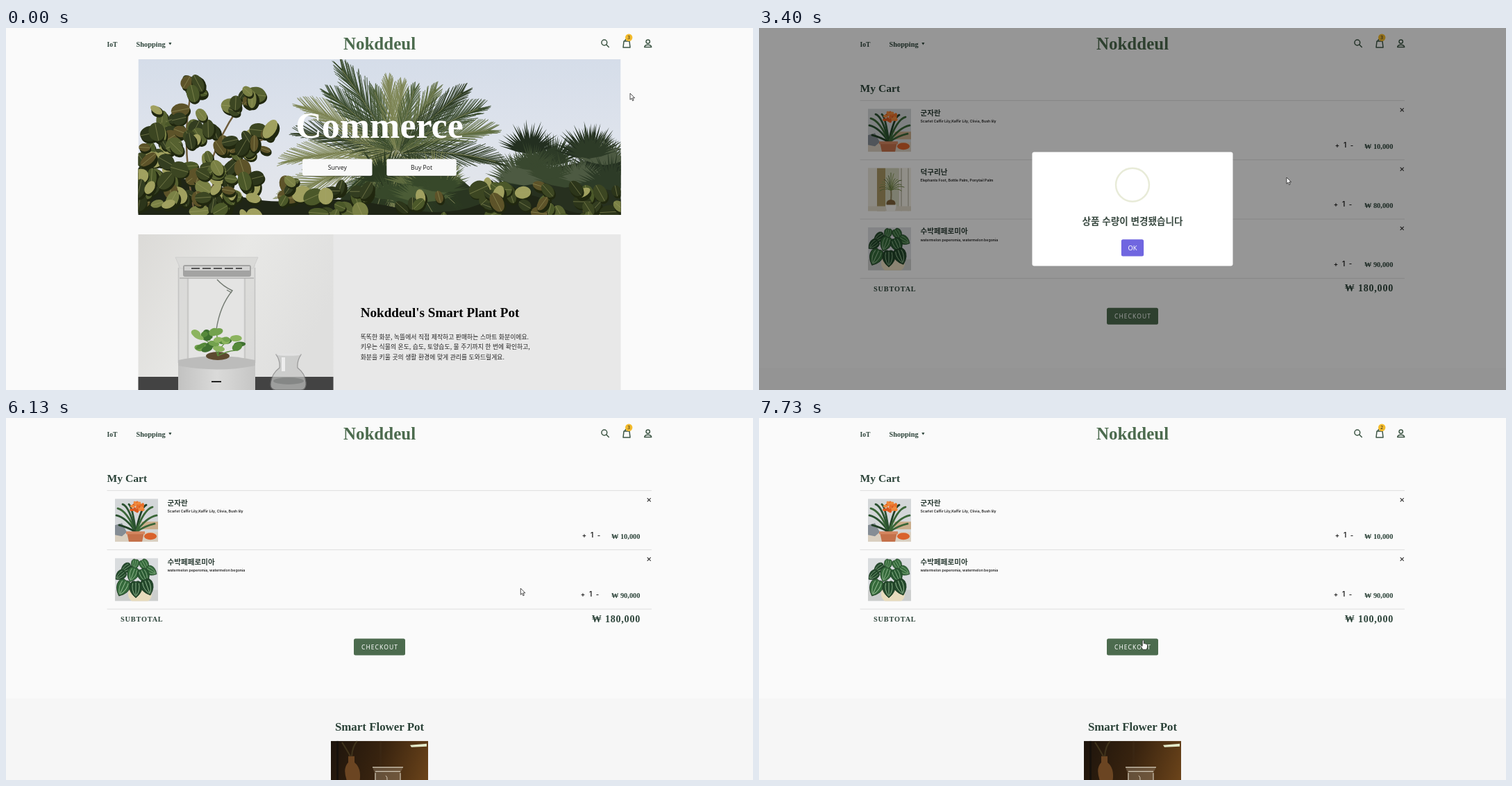
An HTML page that plays this animation: 1076 by 521 pixels, repeating every 8000 ms.

```html
<!DOCTYPE html>
<html lang="ko">
<head>
<meta charset="utf-8">
<title>Plant shop cart</title>
<style>
html, body { margin: 0; width: 100%; height: 100%; overflow: hidden; background: #fafafa; }
svg { display: block; }
#stage { width: 100vw; height: 100vh; }
text { white-space: pre; }
.serif { font-family: "Liberation Serif", "Noto Serif", serif; font-weight: 700; fill: #2c4339; }
.sans { font-family: "Noto Sans", "Open Sans", sans-serif; fill: #222; }
.kor { font-family: "Noto Sans CJK KR", "Noto Sans CJK", "Noto Sans", sans-serif; fill: #222; }
.inter { font-family: Inter, Roboto, sans-serif; font-weight: 600; fill: #222; }
.mid { text-anchor: middle; }
.end { text-anchor: end; }
.ico { fill: none; stroke: #3c5544; stroke-width: 1.5; stroke-linecap: round; stroke-linejoin: round; }
</style>
</head>
<body>
<svg id="stage" viewBox="0 0 1076 521" preserveAspectRatio="none"></svg>
<script>
const LOOP = 8000, TICK = 1000 / 15, PITCH = 85.3;
const GREEN = '#4c6b4e', OLIVE = '#a3ae7e', VIOLET = '#7066e0';

let seed = 7;
const rnd = (a = 0, b = 1) => {
  seed = (seed * 16807) % 2147483647;
  return a + (b - a) * seed / 2147483647;
};
const pick = list => list[Math.floor(rnd(0, list.length))];
const f = n => n.toFixed(1);
const rad = deg => deg * Math.PI / 180;

const text = (cls, x, y, size, str, more = '') =>
  `<text class="${cls}" x="${x}" y="${y}" font-size="${size}" ${more}>${str}</text>`;
const rect = (x, y, w, h, fill, more = '') =>
  `<rect x="${x}" y="${y}" width="${w}" height="${h}" fill="${fill}" ${more}/>`;
const oval = (x, y, rx, ry, fill, turn = 0) =>
  `<ellipse cx="${f(x)}" cy="${f(y)}" rx="${f(rx)}" ry="${f(ry)}" fill="${fill}" transform="rotate(${f(turn)} ${f(x)} ${f(y)})"/>`;
const line = (d, color, w, more = '') =>
  `<path d="${d}" fill="none" stroke="${color}" stroke-width="${w}" ${more}/>`;
const grad = (id, stops, dir = 'x2="0" y2="1"') =>
  `<linearGradient id="${id}" ${dir}>${stops.map((c, i) =>
    `<stop offset="${i / (stops.length - 1)}" stop-color="${c}"/>`).join('')}</linearGradient>`;

// A feathered palm leaf: narrow leaflets along a drooping rib.
function frond(x, y, deg, len, color, droop) {
  const a = rad(deg), n = Math.round(len / 3.5);
  const at = u => [x + Math.cos(a) * len * u, y + Math.sin(a) * len * u + droop * u * u];
  let d = '';
  for (let i = 2; i <= n; i++) {
    const u = i / n, [px, py] = at(u), l = len * .3 * Math.sin(Math.PI * (.2 + .65 * u));
    for (const side of [-1, 1]) {
      const b = a + side * (.55 - .3 * u) + rnd(-.08, .08);
      const w = 1.1, wx = f(-Math.sin(b) * w), wy = f(Math.cos(b) * w);
      d += `M${f(px)} ${f(py)}l${wx} ${wy}l${f(Math.cos(b) * l)} ${f(Math.sin(b) * l + droop * .15)}z`;
    }
  }
  const [mx, my] = at(.5), [ex, ey] = at(1);
  return `<path d="${d}" fill="${color}" stroke="${color}" stroke-width=".5"/>` +
    line(`M${x} ${y}Q${f(mx)} ${f(my - droop * .25)} ${f(ex)} ${f(ey)}`, '#7e8256', 1);
}

// A round palm leaf: sharp blades spreading from one point.
function fan(x, y, r, from, to, color) {
  let d = '';
  for (let deg = from; deg <= to; deg += 5) {
    const a = rad(deg + rnd(-2, 2)), l = r * rnd(.75, 1.05), w = r * .035;
    const bx = x + Math.cos(a) * l * .4, by = y + Math.sin(a) * l * .4;
    const sx = -Math.sin(a) * w, sy = Math.cos(a) * w;
    d += `M${f(x)} ${f(y)}L${f(bx + sx)} ${f(by + sy)}L${f(x + Math.cos(a) * l)} ${f(y + Math.sin(a) * l)}L${f(bx - sx)} ${f(by - sy)}Z`;
  }
  return `<path d="${d}" fill="${color}"/>`;
}

function hero() {
  let s = rect(190.5, 45, 695, 224, 'url(#sky)');
  const dark = ['#232f20', '#2d3b27', '#39482f'], palm = ['#37482a', '#4b5c36', '#2c3b22', '#5f6c40', '#7d8453'];
  s += '<path d="M715 269Q740 215 775 205T886 185V269Z" fill="#27301f"/>';
  for (let i = 0; i < 16; i++)
    s += fan(rnd(735, 885), rnd(165, 245), rnd(38, 62), -165, -15, pick(dark.concat('#4d5a42')));
  s += '<path d="M470 269Q500 205 560 190T690 250L705 269Z" fill="#2a3621"/>';
  for (let i = 0; i < 9; i++) s += frond(560, 182, 15 + i * 19, rnd(75, 115), pick(palm), 12);
  for (const deg of [-192, -172, -158, -146, -133, -120, -107, -96, -86, -76, -62, -48, -36, -24, -8])
    s += frond(562, 182, deg, deg < -115 || deg > -50 ? rnd(135, 160) : rnd(105, 125), pick(palm), 34 - 24 * Math.abs(Math.sin(rad(deg))));
  for (let i = 0; i < 12; i++) s += fan(rnd(495, 665), rnd(215, 260), rnd(35, 55), -170, -10, pick(palm));
  s += '<path d="M190 269V222Q240 205 300 230T420 248T560 258T690 250T790 254T886 246V269Z" fill="#1f2516"/>';
  s += line('M272 268Q250 160 268 88M280 266Q290 170 345 102M285 266Q300 190 375 158', '#6f5d3c', 2.5);
  const clumps = [
    [262, 92, 18, 6], [234, 130, 26, 12], [342, 104, 22, 10], [225, 168, 30, 18], [285, 140, 20, 7],
    [300, 185, 36, 20], [360, 162, 22, 12], [230, 222, 42, 32], [315, 236, 46, 28], [410, 234, 18, 8],
    [480, 256, 40, 18], [600, 261, 32, 8], [702, 248, 26, 12], [765, 259, 40, 14], [852, 255, 32, 14]
  ];
  const leaf = ['#3c4622', '#566130', '#7a8145', '#2c351a', '#a0a05f', '#5d5329', '#4b5829', '#333d20'];
  for (const [x, y, r, n] of clumps) for (let i = 0; i < n; i++) {
    const px = x + rnd(-r, r), py = y + rnd(-r, r) * .8, q = rnd(8, 15), turn = rnd(0, 180);
    s += oval(px + 1.5, py + 3, q, q * .75, '#20270f', turn) + oval(px, py, q, q * rnd(.5, .9), pick(leaf), turn);
    const cx = q * Math.cos(rad(turn)), cy = q * Math.sin(rad(turn));
    s += line(`M${f(px - cx)} ${f(py - cy)}L${f(px + cx)} ${f(py + cy)}`, '#a5a468', .5);
  }
  return `<g clip-path="url(#heroBox)">${s}</g>`;
}

function potPhoto() {
  let s = rect(190.5, 297, 281, 224, 'url(#wall)') + rect(190.5, 502, 281, 19, '#434343');
  s += rect(248, 340, 111, 150, '#d6d6d4', 'opacity=".6"') + rect(262, 360, 82, 120, '#e4e4e3');
  s += line('M248.5 345V482M358.5 345V482', '#c4c4c3', 1.6) + line('M262 360V478M344 360V478', '#c9c9c8', 2.5);
  s += '<path d="M244 330H363L356 346H251Z" fill="#dadad8" stroke="#cfcfce"/>';
  s += rect(255, 341, 98, 17, '#a3a3a2', 'rx="3"') + rect(257, 343, 94, 6, '#d3d3d2') +
    line('M267 346H340', '#555', 2, 'stroke-dasharray="12 4"') + line('M250 360H357', '#b0b0af', 1.3);
  s += '<path d="M248 478Q304 466 359 478V521H248Z" fill="#bcbcbb"/>' +
    '<path d="M248 486Q304 497 359 486V521H248Z" fill="url(#base)"/>' + rect(296, 508, 14, 2, '#222');
  s += oval(305, 472, 17, 6, '#5d4a30') + line('M304 362Q313 372 326 378Q308 400 303 434M318 377L325 381', '#737a72', 1.4);
  s += line('M305 472Q302 456 284 448M305 472Q308 455 327 446M305 472Q306 452 303 438M305 472Q318 465 330 464', '#5b8a3d', 1.3);
  for (let i = 0; i < 24; i++)
    s += oval(305 + rnd(-32, 32), 449 + rnd(-13, 13), rnd(5, 9), rnd(3, 5.5), pick(['#55893a', '#73a24e', '#3f7030', '#8cb45f']), rnd(-35, 35));
  s += '<path d="M389 470H425Q419 479 420 489Q433 499 432 514Q431 521 425 521H388Q381 520 381 513Q382 498 394 489Q395 478 389 470Z" fill="#c4c5c4" opacity=".7" stroke="#777" stroke-width="1.2"/>' +
    rect(397, 474, 5, 20, '#f5f5f5', 'opacity=".8"') + oval(407, 508, 22, 5, '#858786') + oval(407, 470, 18, 1.8, '#e2e2e2');
  return s;
}

const thumb = (id, y, art) => `<svg id="${id}" x="157" y="${y}" width="62" height="62" viewBox="0 0 62 62">${art}</svg>`;

function clivia() {
  let s = rect(0, 0, 62, 62, '#d3d6d8') + rect(0, 48, 62, 14, '#d9cfc0') + rect(38, 33, 24, 11, '#c9ad8b') +
    '<path d="M0 38L10 35L17 48L10 54L0 52Z" fill="#858d95"/>' + oval(51, 54, 9, 5, '#d9622c');
  const tips = [[2, 24], [4, 14], [11, 8], [20, 8], [45, 9], [54, 12], [60, 24], [57, 36], [6, 38]];
  for (const [x, y] of tips)
    s += line(`M30 48Q${(x + 30) / 2} ${y + 3} ${x} ${y}`, pick(['#2b5230', '#3a6637', '#213f25']), 2.9, 'stroke-linecap="round"');
  for (let i = 0; i < 20; i++) s += oval(33 + rnd(-9, 9), 11 + rnd(-5, 6), 3.4, 2, pick(['#e8702a', '#f08a3c', '#d9581e']), rnd(0, 180));
  return s + '<path d="M17 48H42L39 62H20Z" fill="#c4714a"/>' + rect(16, 47, 27, 4, '#d48660');
}

function ponytail() {
  let s = rect(0, 0, 62, 62, '#d6d2bf') + rect(0, 0, 13, 62, '#e7e4d8') + rect(13, 0, 12, 62, '#a89562') +
    rect(25, 0, 19, 55, '#cfd2b9') + rect(45, 0, 17, 62, '#efece2') + rect(47, 0, 2, 62, '#c6c2b2') + rect(57, 0, 2, 62, '#cbc8b9');
  s += rect(0, 55, 62, 7, '#ddd6c6') + line('M33 50Q34 38 33 27', '#8c8259', 2);
  for (let i = 0; i < 15; i++) {
    const a = Math.PI * (1 + i / 14), c = Math.cos(a), r = rnd(17, 24);
    s += line(`M33 32Q${f(33 + r * .5 * c)} ${f(28 + r * .8 * Math.sin(a))} ${f(33 + r * c * .85)} ${f(29 + r * Math.sin(a) + 4 * Math.abs(c))}`,
      pick(['#6f8244', '#8a9a58', '#566b37']), 1);
  }
  return s + oval(33, 51, 6.5, 5.5, '#7d6138') + '<path d="M25 53H41L39 62H27Z" fill="#f3f1ec"/>';
}

function peperomia() {
  let s = rect(0, 0, 62, 62, '#d9dcde') + rect(0, 46, 62, 16, '#cccecd') + oval(36, 52, 17, 14, '#e8dcbd');
  const spots = [[17, 14, 55, .8], [29, 8, 10, .7], [42, 9, -30, .8], [51, 18, -60, .8], [9, 24, 50, .8],
    [26, 22, 20, 1], [41, 24, -25, 1], [12, 41, 25, 1.15], [30, 43, 0, 1.1], [46, 40, -20, 1.1]];
  for (const [x, y, r, k] of spots)
    s += `<g transform="translate(${x} ${y}) rotate(${r}) scale(${k})"><path d="M0 13Q-10 5 -8 -4Q-5 -11 0 -8Q5 -11 8 -4Q10 5 0 13Z" fill="${pick(['#2a5a33', '#356a3b', '#23482b'])}" stroke="#1d3a22" stroke-width=".7"/>` +
      line('M0 11V-7M-1 10Q-6 2 -4 -6M1 10Q6 2 4 -6', '#98bd94', .8) + '</g>';
  return s;
}

function lampPhoto() {
  return `<svg x="468" y="550" width="140" height="140" viewBox="0 0 140 140">` +
    rect(0, 0, 140, 140, 'url(#dusk)') + rect(8, 0, 3, 60, '#17110b') + rect(70, 0, 3, 60, '#3c2814', 'opacity=".6"') +
    '<path d="M24 60Q16 40 25 31V22H34V31Q45 40 41 60Z" fill="#6b4522"/>' +
    line('M28 22Q20 8 16 2M30 22Q31 8 38 0', '#40341c', 2) +
    '<path d="M114 6L138 4V8L116 9Z" fill="#e4ebcb"/>' +
    '<path d="M60 38H104L100 46V90H63V46Z" fill="#8e7a62" opacity=".5"/>' +
    line('M60 38H104M64 44H100M64 46V70M100 46V70', '#cfc6b4', 1.2) + line('M79 50Q84 54 77 66', '#d5cbb7', 1) + '</svg>';
}

const hline = y => line(`M145.5 ${y}H930`, '#dedede', 1);

function row(id, i, name, sub, qx, price, art) {
  const y = i * PITCH;
  return `<g id="${id}">` + thumb(id + 'Pic', 116.2 + y, art) +
    text('kor', 232.5, 125.5 + y, 10.6, name, 'font-weight="700" style="fill:#2c3d35"') +
    text('inter', 232.5, 136 + y, 5.2, sub) +
    line(`M923.7 ${115.3 + y}l5 5m0 -5l-5 5`, '#333', 1.2) +
    text('inter mid', qx, 172 + y, 9.5, '+') + text('inter mid', qx + 11, 172 + y, 10, '1', `id="${id}Qty"`) +
    text('inter mid', qx + 21, 171.7 + y, 9.5, '-') +
    text('serif end', 913.5, 173.5 + y, 10.4, price, `id="${id}Price"`) + hline(189.7 + y) + '</g>';
}

const button = (x, y, w, label, space) =>
  rect(x, y, w, 24, GREEN, 'rx="2.5"') +
  text('sans mid', x + w / 2 + space / 2, y + 15.2, 8.5, label, `letter-spacing="${space}" style="fill:#fff"`);

const heading = y => text('serif mid', 538, y, 16.9, 'Smart Flower Pot');

const header =
  text('serif', 145.5, 26.5, 9.6, 'IoT') + text('serif', 187.5, 26.5, 10.4, 'Shopping') +
  '<path d="M234.3 21H238.5L236.4 24.6Z" fill="#2c4339"/>' +
  text('serif mid', 538, 31, 25, 'Nokddeul', `style="fill:${GREEN}"`) +
  '<g class="ico"><circle cx="861.8" cy="21" r="3.9"/><path d="M864.8 24L868.3 27.5"/>' +
  '<path d="M890 19H898L899 28H889ZM891.5 19V18Q894 14 896.5 18V19"/>' +
  '<circle cx="924.7" cy="19.6" r="2.7"/><path d="M919.7 27.6Q920 24.3 924.7 24.3Q929.4 24.3 929.7 27.6Z"/></g>' +
  '<circle cx="897.2" cy="13.8" r="5.2" fill="#f3bb2d"/>' + text('sans mid', 897.2, 16.2, 6.5, '3', 'id="badge"');

const home = hero() + text('serif mid', 538, 158, 52, 'Commerce', 'style="fill:#fff"') +
  [[427, 'Survey'], [548.3, 'Buy Pot']].map(([x, s]) =>
    rect(x, 190, 100.5, 24, '#000', 'rx="2.5" opacity=".22"') + rect(x, 188.5, 100.5, 24.3, '#f9f9f9', 'rx="2.5"') +
    text('sans mid', x + 50.3, 203.8, 8.6, s)).join('') +
  rect(471, 297, 414.5, 224, '#e8e8e8') + potPhoto() +
  text('serif', 510.7, 416, 19.1, "Nokddeul's Smart Plant Pot", 'style="fill:#000"') +
  ['똑똑한 화분, 녹뜰에서 직접 제작하고 판매하는 스마트 화분이에요.',
   '키우는 식물의 온도, 습도, 토양습도, 물 주기까지 한 번에 확인하고,',
   '화분을 키울 곳의 생활 환경에 맞게 관리를 도와드릴게요.'].map((s, i) => text('kor', 510.7, 447.8 + i * 14.4, 8.87, s)).join('');

const empty = rect(0, 259, 1076, 262, '#f6f6f6') + text('kor mid', 538, 136.5, 21, '장바구니가 비었습니다.', 'font-weight="300"') +
  button(481, 157, 114, 'Continue shopping', .9) + heading(306) +
  text('serif mid', 538, 468.2, 11.35, 'Premier Clever Garden Pot') +
  text('serif mid', 538, 484.5, 8, '₩ 36,000', 'style="fill:#111"') +
  text('sans mid', 538, 504.7, 8.4, 'ADD TO CART') + line('M509.5 510.3H566.5', '#2c4339', 1.2);

const cart = text('serif', 145.5, 91.5, 15.6, 'My Cart') + hline(104.4) +
  row('r1', 0, '군자란', 'Scarlet Caffir Lily,Kaffir Lily, Clivia, Bush lily', 833, '₩ 10,000', clivia()) +
  row('r2', 1, '덕구리난', 'Elephants Foot, Bottle Palm, Ponytail Palm', 831, '₩ 80,000', ponytail()) +
  '<g id="low">' + row('r3', 2, '수박페페로미아', 'watermelon peperomia, watermelon begonia', 831, '₩ 90,000', peperomia()) +
  text('serif', 165, 378.7, 10.3, 'SUBTOTAL', 'letter-spacing=".8"') +
  text('serif end', 914, 379, 14, '', 'id="total" letter-spacing=".8"') +
  button(501, 402.8, 74, 'CHECKOUT', 1.1) + rect(0, 489, 1076, 260, '#f6f6f6') + heading(535) + lampPhoto() + '</g>';

const modal = rect(394.5, 179, 287, 163, '#fff', 'rx="3"') +
  '<circle cx="538" cy="226" r="23.8" fill="none" stroke="#e8ebd8" stroke-width="2.4"/>' +
  line('', OLIVE, 2.4, 'id="spin"') +
  line('M525 226.5L534 235.5L552 217.5', OLIVE, 3, 'id="check" pathLength="1" stroke-dasharray="1 2" stroke-linecap="round"') +
  text('kor mid', 538, 283, 13.5, '', 'id="note" font-weight="700" style="fill:#3a4a42"') +
  rect(520.5, 302.5, 35, 27, '#b9b4ea', 'id="halo" rx="4"') + rect(522, 304, 32, 24, VIOLET, 'id="ok" rx="2.5"') +
  text('sans mid', 538, 319.5, 9.2, 'OK', 'style="fill:#fff"');

const arrow = '<path d="M0 0V9.2L2.1 7.2L3.6 10.7L5.1 10L3.6 6.7H6.6Z" fill="#fff" stroke="#222" stroke-width=".8" stroke-linejoin="round"/>';
const hand = '<path d="M-1.1 7.6V1Q0 -.8 1.1 1V5Q2.2 4.1 3 5.3Q4.1 4.6 4.7 5.9Q6 5.4 6.2 7V9.6Q6 12 4.7 13.6H-.6Q-1.8 11 -3.4 8.6Q-3.2 6.8 -1.1 8.6Z" fill="#fff" stroke="#222" stroke-width=".8" stroke-linejoin="round"/>';

stage.innerHTML = '<defs>' + grad('sky', ['#d5dde9', '#dee3ec', '#e4e6ea']) +
  grad('wall', ['#dbdad7', '#e8e8e6', '#dfdfde'], 'x2="1" y2=".4"') + grad('dusk', ['#1d140c', '#38230f', '#6a431a'], 'x2="1" y2=".35"') +
  grad('base', ['#c2c2c1', '#dadad9', '#c6c6c5'], 'x2="1" y2="0"') +
  '<clipPath id="heroBox"><rect x="190.5" y="45" width="695" height="224"/></clipPath></defs>' +
  rect(0, 0, 1076, 521, '#fafafa') +
  `<g id="home">${home}</g><g id="empty">${empty}</g><g id="cart">${cart}</g>${header}` +
  rect(0, 0, 1076, 521, '#000', 'id="shade"') + `<g id="modal">${modal}</g>` +
  `<g id="cursor"><g id="arrow">${arrow}</g><g id="hand">${hand}</g></g>`;

const $ = id => document.getElementById(id);
const set = (id, name, v) => $(id).setAttribute(name, v);
const show = (id, on) => set(id, 'display', on ? 'inline' : 'none');
const clamp = (v, a = 0, b = 1) => Math.min(b, Math.max(a, v));
const ease = x => 1 - Math.pow(1 - clamp(x), 2.2);

// Piecewise-linear value over [time, value] points.
function along(points, t, k = 1) {
  let i = 0;
  while (i < points.length - 2 && t >= points[i + 1][0]) i++;
  const a = points[i], b = points[i + 1];
  return a[k] + (b[k] - a[k]) * clamp((t - a[0]) / (b[0] - a[0]));
}

// time, x, y, hand
const path = [
  [0, 899, 94, 0], [300, 899, 94, 0], [470, 904.5, 78, 0], [733, 897, 33, 0], [830, 897, 33, 0],
  [930, 896, 29, 1], [1000, 895.3, 25.5, 1], [1880, 895.3, 25.5, 1], [1990, 892, 40, 0],
  [2330, 852, 142, 0], [2530, 831, 183, 0], [2733, 854, 171, 1], [2933, 852.3, 168.5, 1],
  [3200, 852.3, 168.5, 1], [3400, 760, 215, 0], [3667, 575, 298, 0], [3867, 540, 312, 1],
  [4120, 540, 310, 0], [4180, 540, 310, 0], [4467, 760, 250, 0], [4733, 932, 208, 0],
  [4933, 954, 213, 0], [5067, 930, 204, 0], [5210, 930, 204, 0], [5400, 935, 205, 0],
  [5600, 924.5, 202, 1], [5930, 924.5, 202, 1], [5990, 900, 208, 0], [6133, 741.5, 245, 0],
  [6400, 600, 294, 0], [6667, 548, 318, 1], [7067, 539.5, 313, 1], [7500, 539.5, 313, 1],
  [7733, 553.3, 319.7, 1], [LOOP, 553.3, 319.7, 1]
];

const dialogs = [
  { from: 3220, hover: 3860, to: 4067, note: '상품 수량이 변경됐습니다' },
  { from: 6160, hover: 6660, to: 7200, note: '성공적으로 삭제됐습니다' }
];
const pop = [[0, .7], [135, 1.05], [240, .95], [300, 1]];
const ring = deg => f(538 + 23.8 * Math.cos(rad(deg))) + ' ' + f(226 + 23.8 * Math.sin(rad(deg)));

function drawDialog(t) {
  const d = dialogs.find(d => t >= d.from && t < d.to + 150);
  show('modal', d);
  show('shade', d);
  if (!d) return;
  const age = t - d.from, out = t - d.to, gone = ease(out / 150);
  const press = out > -10 && out < 10;
  const scale = out > 0 ? 1 - .5 * gone : along(pop, age);
  set('modal', 'transform', `translate(538 260.5) scale(${scale}) translate(-538 -260.5)`);
  set('modal', 'opacity', Math.pow(1 - gone, 1.4));
  set('shade', 'opacity', .4 * ease(age / 100) * (1 - ease(out / 100)));
  $('note').textContent = d.note;
  set('ok', 'fill', press ? '#5a52b3' : t > d.hover && out < 0 ? '#655cca' : VIOLET);
  show('halo', out > -10);
  const drawn = clamp((age - 400) / 330);
  show('check', drawn > 0);
  set('check', 'stroke-dashoffset', 1 - drawn);
  const turn = 360 * clamp((age - 212) / 298);
  const from = turn < 180 ? 45 : 225 - turn, end = turn < 180 ? 45 - turn : -135;
  set('spin', 'd', from - end > 1 ? `M${ring(from)}A23.8 23.8 0 0 0 ${ring(end)}` : '');
}

function render(ms) {
  const t = Math.floor(ms / TICK + .1) * TICK;
  show('home', t < 1190);
  show('empty', t >= 1190 && t < 1320);
  show('cart', t >= 1320);

  const less = t >= 3060, removed = t >= 5860;
  $('r1Qty').textContent = less ? '1' : '2';
  $('r1Price').textContent = less ? '₩ 10,000' : '₩ 20,000';
  $('total').textContent = '₩ ' + (t < 3220 ? '190,000' : t < 6160 ? '180,000' : '100,000');
  $('badge').textContent = t < 6160 ? '3' : '2';
  show('r2', !removed);
  set('low', 'transform', `translate(0 ${removed ? -PITCH : 0})`);

  drawDialog(t);

  const key = path.filter(p => p[0] <= t + 1).pop();
  set('cursor', 'transform', `translate(${f(along(path, t, 1))} ${f(along(path, t, 2))})`);
  show('hand', key[3]);
  show('arrow', !key[3]);
}

const start = performance.now();
function frame() {
  render((performance.now() - start) % LOOP);
  requestAnimationFrame(frame);
}
frame();
</script>
</body>
</html>
```
